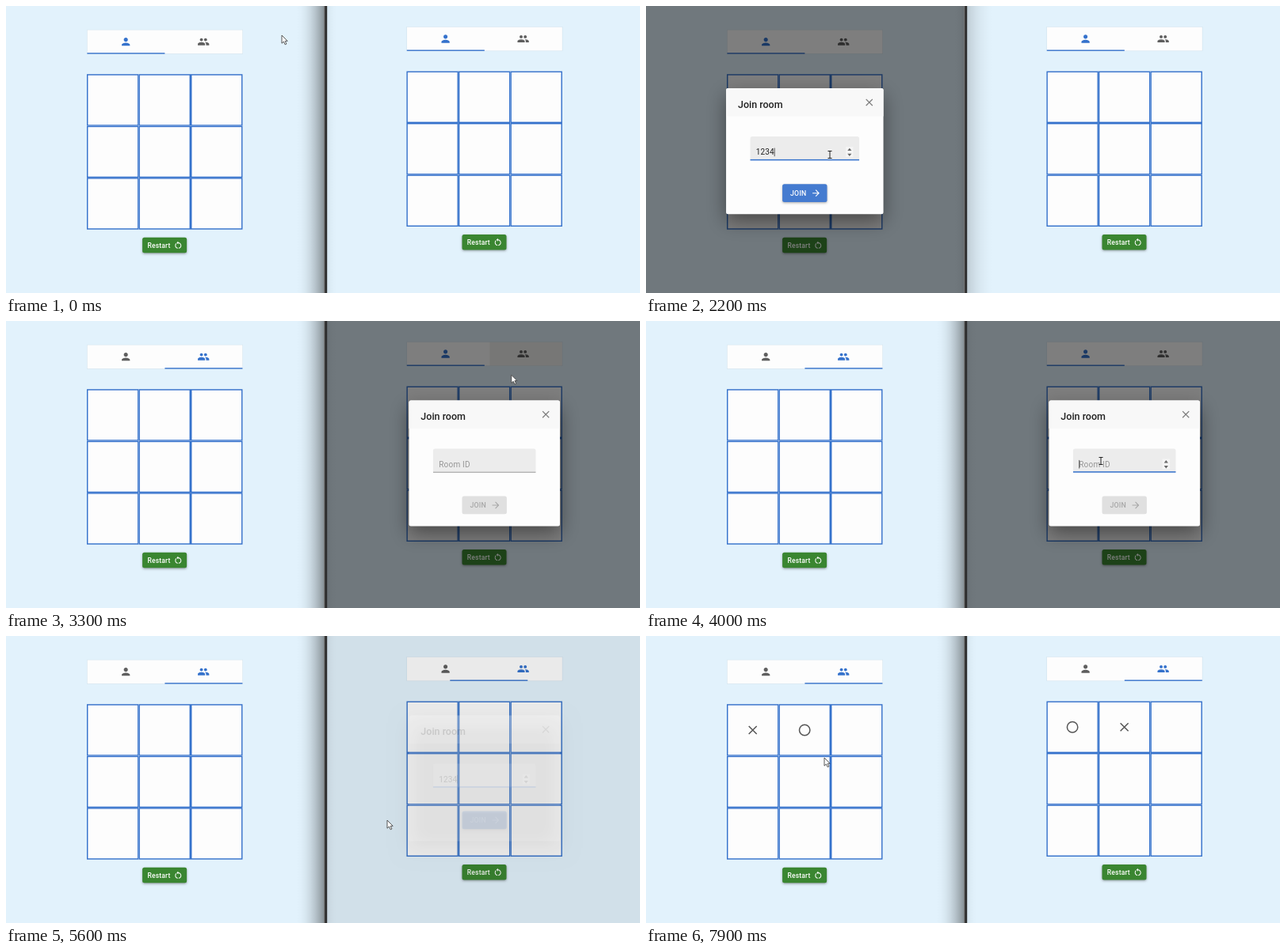
Write an HTML page with a canvas that moves like this. It is 800 px wide and 363 px high and loops after 8 s.

```html
<!DOCTYPE html>
<html lang="en">
<head>
<meta charset="utf-8">
<title>Two player board</title>
<style>
html, body { margin: 0; width: 100%; height: 100%; overflow: hidden; background: #e2f2fc; }
canvas { display: block; width: 800px; height: 363px; }
</style>
</head>
<body>
<canvas id="stage"></canvas>
<script>
const W = 800, H = 363, LOOP = 8000, STEP = 100;
const BLUE = '#3572cc', GREY = '#5f5f5f', PAPER = '#fdfdfd';
const canvas = document.getElementById('stage');
const ctx = canvas.getContext('2d');
const dpr = window.devicePixelRatio || 1;
canvas.width = W * dpr;
canvas.height = H * dpr;

const ICONS = {
  person: new Path2D('M12 12c2.21 0 4-1.79 4-4s-1.79-4-4-4-4 1.79-4 4 1.79 4 4 4zm0 2c-2.67 0-8 1.34-8 4v2h16v-2c0-2.66-5.33-4-8-4z'),
  people: new Path2D('M16 11c1.66 0 3-1.34 3-3s-1.34-3-3-3-3 1.34-3 3 1.34 3 3 3zm-8 0c1.66 0 3-1.34 3-3s-1.34-3-3-3-3 1.34-3 3 1.34 3 3 3zm0 2c-2.33 0-7 1.17-7 3.5V19h14v-2.5c0-2.33-4.67-3.5-7-3.5zm8 0c-.29 0-.62.02-.97.05 1.16.84 1.97 1.97 1.97 3.45V19h6v-2.5c0-2.33-4.67-3.5-7-3.5z'),
  restart: new Path2D('M12 5V2L8 6l4 4V7c3.31 0 6 2.69 6 6 0 2.97-2.17 5.43-5 5.91v2.02c3.95-.49 7-3.85 7-7.93 0-4.42-3.58-8-8-8zm-6 8c0-1.65.67-3.15 1.76-4.24L6.34 7.34C4.9 8.79 4 10.79 4 13c0 4.08 3.05 7.44 7 7.93v-2.02c-2.83-.48-5-2.94-5-5.91z'),
  close: new Path2D('M19 6.4 17.6 5 12 10.6 6.4 5 5 6.4 10.6 12 5 17.6 6.4 19 12 13.4 17.6 19 19 17.6 13.4 12z'),
  forward: new Path2D('M12 4l-1.4 1.4L16.2 11H4v2h12.2l-5.6 5.6L12 20l8-8z'),
  arrow: new Path2D('M0 0V10.2L2.4 8 4.2 11.8 5.9 11 4.2 7.3H7.2z')
};

// Each pane: position of the board and the moments of its events.
const LEFT = {
  x: 102, y: 30, from: 0, to: 402, dialogW: 198.5,
  open: 600, close: 2660, focus: 1300, keys: [1500, 1700, 1900, 2100], hover: [550, 1250],
  marks: [['x', 0, 6250], ['o', 1, 7350]]
};
const RIGHT = {
  x: 505.4, y: 26.3, from: 405, to: W, dialogW: 190.5,
  open: 3050, close: 5488, focus: 3900, keys: [4350, 4500, 4700, 4850], hover: [3000, 3850],
  marks: [['o', 0, 6350], ['x', 1, 7300]]
};

// Pointer stops: time, x, y.
const POINTER = [
  [0, 348, 37], [480, 250, 46], [650, 250, 46], [900, 254, 152], [1250, 232, 188],
  [2200, 232, 188], [2400, 203, 237], [2520, 203, 237], [2800, 645, 64], [2950, 652, 44],
  [3150, 652, 44], [3700, 574, 177], [4900, 574, 177], [5200, 605, 234], [5400, 605, 234],
  [5600, 481, 233], [6150, 136, 120], [6350, 136, 120], [7050, 604, 117], [7350, 604, 117],
  [7900, 225, 154]
];

const clamp = v => Math.max(0, Math.min(1, v));
const smooth = v => v * v * (3 - 2 * v);

// Standard material curve, cubic-bezier(.4, 0, .2, 1).
function ease(p) {
  p = clamp(p);
  let lo = 0, hi = 1, s = p;
  for (let i = 0; i < 20; i++) {
    s = (lo + hi) / 2;
    const x = 1.2 * s * (1 - s) ** 2 + 0.6 * s * s * (1 - s) + s ** 3;
    if (x < p) lo = s; else hi = s;
  }
  return 3 * s * s * (1 - s) + s ** 3;
}

function rect(x, y, w, h, color) {
  ctx.fillStyle = color;
  ctx.fillRect(x, y, w, h);
}

function round(x, y, w, h, r, color) {
  ctx.fillStyle = color;
  ctx.beginPath();
  ctx.roundRect(x, y, w, h, r);
  ctx.fill();
}

function shadow(color, blur, dy) {
  ctx.shadowColor = color;
  ctx.shadowBlur = blur * dpr;
  ctx.shadowOffsetY = dy * dpr;
}

const noShadow = () => shadow('transparent', 0, 0);

function text(str, x, y, size, color, weight = 400, spacing = 0) {
  ctx.font = `${weight} ${size}px Roboto, "Liberation Sans", sans-serif`;
  ctx.letterSpacing = spacing + 'px';
  ctx.fillStyle = color;
  ctx.fillText(str, x, y);
}

function icon(name, cx, cy, size, color) {
  ctx.save();
  ctx.translate(cx - size / 2, cy - size / 2);
  ctx.scale(size / 24, size / 24);
  ctx.fillStyle = color;
  ctx.fill(ICONS[name]);
  ctx.restore();
}

function mark(kind, cx, cy) {
  ctx.strokeStyle = '#555';
  ctx.lineWidth = 1.5;
  ctx.beginPath();
  if (kind === 'o') {
    ctx.arc(cx, cy, 6.7, 0, 7);
  } else {
    ctx.moveTo(cx - 5, cy - 5); ctx.lineTo(cx + 5, cy + 5);
    ctx.moveTo(cx + 5, cy - 5); ctx.lineTo(cx - 5, cy + 5);
  }
  ctx.stroke();
}

function tabs(p, t) {
  const multi = t >= p.close;
  rect(p.x, p.y - 0.2, 197, 31, '#d3e4ef');
  rect(p.x + 0.6, p.y + 0.4, 195.8, 29.8, PAPER);
  if (t >= p.hover[0] && t < p.hover[1]) rect(p.x + 105, p.y + 0.4, 91.4, 29.8, 'rgba(80,60,40,.07)');
  icon('person', p.x + 49.2, p.y + 15.2, 15.4, multi ? GREY : BLUE);
  icon('people', p.x + 147.2, p.y + 15.2, 15.6, multi ? BLUE : GREY);
  rect(p.x + 0.4 + 98 * ease((t - p.close) / 300), p.y + 29.2, 98, 1.4, BLUE);
}

function board(p, t) {
  const size = 65.5, top = p.y + 56.2;
  ctx.strokeStyle = BLUE;
  ctx.lineWidth = 1.45;
  for (let i = 0; i < 9; i++) {
    const x = p.x + (i % 3) * size, y = top + Math.floor(i / 3) * size;
    rect(x, y, size, size, PAPER);
    ctx.strokeRect(x + 0.72, y + 0.72, size - 1.44, size - 1.44);
  }
  for (const [kind, cell, at] of p.marks) {
    if (t >= at) mark(kind, p.x + 32.7 + cell * size, top + 32.8);
  }
}

function restart(p) {
  const x = p.x + 70.1, y = p.y + 262.8;
  shadow('rgba(0,0,0,.35)', 3, 1.2);
  round(x, y, 56, 19.4, 2.5, '#3a8631');
  noShadow();
  text('Restart', x + 6.3, y + 12.8, 8.6, '#fff', 500, 0.15);
  icon('restart', x + 45.2, y + 9.6, 12, '#fff');
}

function triangle(x, y, h) {
  ctx.fillStyle = '#686868';
  ctx.beginPath();
  ctx.moveTo(x - 2.6, y);
  ctx.lineTo(x + 2.6, y);
  ctx.lineTo(x, y + h);
  ctx.fill();
}

function field(x, y, w, p, t) {
  const focused = t >= p.focus;
  const typed = '1234'.slice(0, p.keys.filter(k => t >= k).length);
  round(x, y, w, 30, [2.5, 2.5, 0, 0], '#ececec');
  if (focused) rect(x, y + 28.8, w, 1.5, BLUE);
  else rect(x, y + 29.4, w, 0.8, '#858585');
  if (typed) text(typed, x + 7.3, y + 23.2, 10, '#222', 400, 0.09);
  else text('Room ID', x + 7.3, y + 23.2, 10, '#969696', 400, 0.2);
  if (!focused) return;
  rect(x + 7.4 + typed.length * 5.7, y + 14.5, 0.8, 10.6, '#333');
  const sx = x + w - 12.2;
  rect(sx - 4.6, y + 13, 9.2, 13, '#f5f5f5');
  triangle(sx, y + 18, -3.4);
  triangle(sx, y + 21.6, 3.4);
}

function dialog(p, t) {
  const a = ease((t - p.open) / 225) * (1 - ease((t - p.close) / 195));
  if (a < 0.004) return;
  ctx.globalAlpha = a;
  rect(p.from, 0, p.to - p.from, H, 'rgba(0,0,0,.5)');
  const w = p.dialogW, mid = p.x + 98.3, x = mid - w / 2, y = p.y + 74.1;
  shadow('rgba(0,0,0,.42)', 24, 9);
  round(x, y, w, 159.2, 2.5, PAPER);
  noShadow();
  round(x, y, w, 35.5, [2.5, 2.5, 0, 0], '#f8f8f8');
  text('Join room', x + 14.9, y + 24.5, 12.5, '#222', 500);
  icon('close', x + w - 17.8, y + 17.8, 15.5, '#7d7d7d');
  field(x + 30.5, y + 61, w - 61, p, t);

  const ready = t >= p.keys[0], bx = mid - 28.2, by = y + 121.2;
  const ink = ready ? '#fff' : '#a8a8a8';
  if (ready) shadow('rgba(0,0,0,.3)', 3, 1.2);
  round(bx, by, 56.4, 22.7, 2.5, ready ? '#447bd0' : '#e0e0e0');
  noShadow();
  text('JOIN', bx + 9.9, by + 14.5, 8.75, ink, 500, 0.25);
  icon('forward', bx + 42.4, by + 11.4, 13.2, ink);
  ctx.globalAlpha = 1;
}

function pane(p, t) {
  ctx.save();
  ctx.beginPath();
  ctx.rect(p.from, 0, p.to - p.from, H);
  ctx.clip();
  rect(p.from, 0, p.to - p.from, H, '#e2f2fc');
  tabs(p, t);
  board(p, t);
  restart(p);
  dialog(p, t);
  ctx.restore();
}

// Soft edge shade running from x0 (strongest) to x1.
function edge(x0, x1, strength) {
  const g = ctx.createLinearGradient(x0, 0, x1, 0);
  for (let i = 0; i <= 6; i++) {
    g.addColorStop(i / 6, `rgba(0,0,0,${(strength * (1 - i / 6) ** 2).toFixed(3)})`);
  }
  rect(Math.min(x0, x1), 0, Math.abs(x1 - x0), H, g);
}

// The window in front casts its shade on the other one.
function divider(t) {
  const leftFront = (t >= 550 && t < 3000) || (t >= 6250 && t < 7300);
  if (leftFront) {
    edge(405, 440, 0.16);
    edge(402, 388, 0.1);
  } else {
    edge(402, 366, 0.42);
    edge(405, 418, 0.06);
  }
  rect(401.2, 0, 1.4, H, '#777');
  rect(402.4, 0, 2.8, H, '#2d2d2d');
}

function pointerAt(t) {
  const i = POINTER.findIndex(k => k[0] > t);
  if (i < 0) return POINTER[POINTER.length - 1].slice(1);
  const [t0, x0, y0] = POINTER[i - 1], [t1, x1, y1] = POINTER[i];
  const s = smooth((t - t0) / (t1 - t0));
  return [x0 + (x1 - x0) * s, y0 + (y1 - y0) * s];
}

function overField(p, x, y, t) {
  const left = p.x + 98.3 - p.dialogW / 2 + 30.5, top = p.y + 135;
  return t > p.open && t < p.close && x > left && x < left + p.dialogW - 61 && y > top && y < top + 30;
}

function pointer(t) {
  const [x, y] = pointerAt(t);
  if (overField(LEFT, x, y, t) || overField(RIGHT, x, y, t)) {
    rect(x - 0.5, y - 4.5, 1, 9, '#222');
    rect(x - 2.5, y - 5, 5, 1, '#222');
    rect(x - 2.5, y + 4, 5, 1, '#222');
    return;
  }
  ctx.save();
  ctx.translate(x, y);
  ctx.fillStyle = '#fff';
  ctx.strokeStyle = '#444';
  ctx.lineWidth = 0.9;
  ctx.fill(ICONS.arrow);
  ctx.stroke(ICONS.arrow);
  ctx.restore();
}

function draw(t) {
  ctx.setTransform(dpr, 0, 0, dpr, 0, 0);
  pane(LEFT, t);
  pane(RIGHT, t);
  divider(t);
  pointer(t);
}

const start = performance.now();
function tick() {
  const t = (performance.now() - start) % LOOP;
  draw(Math.floor(t / STEP) * STEP);
  requestAnimationFrame(tick);
}
tick();
</script>
</body>
</html>
```
